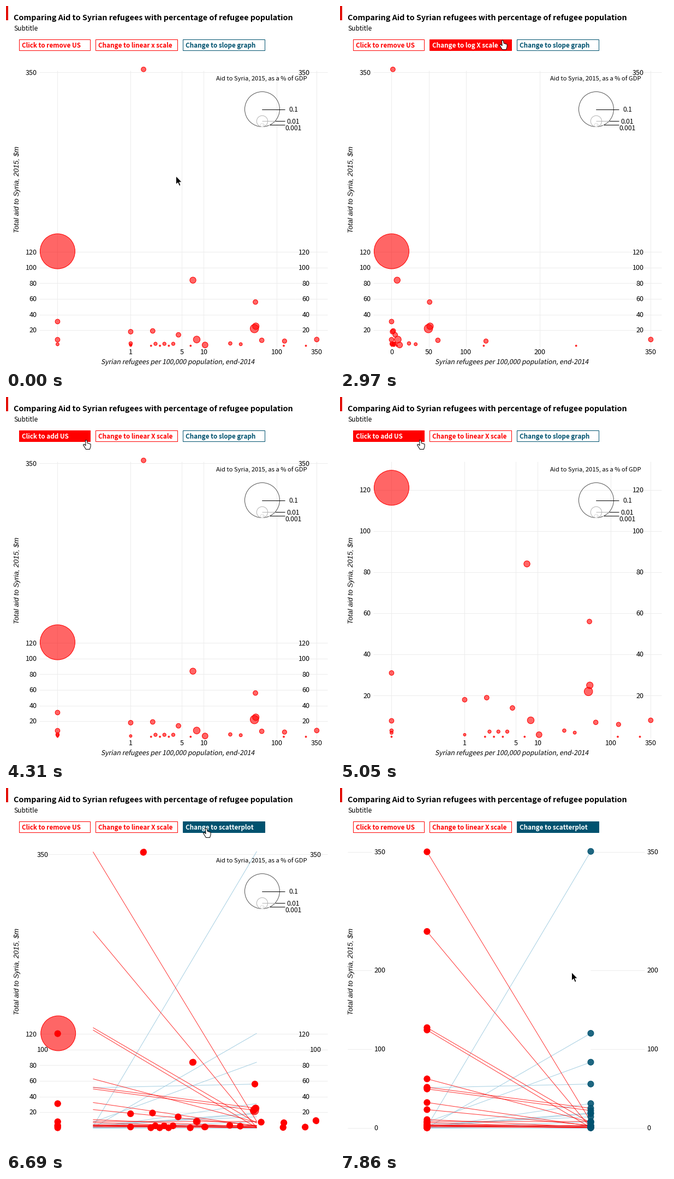
A matplotlib script for the animation above (8000 ms loop, 601 by 663 pixels).

```python
import matplotlib.pyplot as plt
import numpy as np
from matplotlib.animation import FuncAnimation
from matplotlib.collections import LineCollection, PatchCollection
from matplotlib.patches import Circle, PathPatch, Polygon, Rectangle
from matplotlib.textpath import TextPath
from matplotlib.transforms import Affine2D

W, H = 601, 663
LOOP, INTERVAL = 8000, 50
STEP = LOOP / 54          # the picture advances 54 times per loop
FONT = "Noto Sans CJK JP"
RED, BLUE, GRID = "#ff0000", "#00526f", "#ececec"
PX = 0.72                 # points per pixel at 100 dpi
BASE, LEFT_X, RIGHT_X = 620, 159, 459
SCATTER, SLOPE = 1.426, 1.44   # pixels per $m

plt.rcParams["font.family"] = FONT


def lerp(a, b, t):
    return a + (b - a) * t


def ease(now, start, length=1000):
    t = np.clip((now - start) / length, 0, 1)
    return 4 * t ** 3 if t < 0.5 else 1 - 4 * (1 - t) ** 3


def log_x(v):
    return 228 + 134 * np.log10(np.maximum(v, 0.1))


def lin_x(v):
    return 94 + v * 475 / 350


def dataset():
    """Refugees per 100,000, aid in $m and circle radius."""
    single = [(0, 3), (0, 0), (1, 1), (1, 18), (1.5, 354), (2, 19), (4.5, 14), (6.6, 0),
              (23, 3), (32, 2), (50.8, 56), (62, 7), (124, 0), (127, 6), (249, 0), (350, 8)]
    hosts_none = [(0, 31 / 4 ** k) for k in range(3)]
    trail = [(1.9 * 1.15 ** k, 2.5 * (k % 2)) for k in range(6)]
    small = [(v, aid, min(1.3 + 1.1 * aid ** 0.5, 4.3))
             for v, aid in single + hosts_none + trail]
    generous = [(0, 121, 32), (7.1, 84, 5.6), (49.2, 22, 7.7),
                (51.4, 25, 6), (8, 8, 6.2), (10.4, 1, 5.3)]
    return np.array(small + generous).T


VALUE, AID, RADIUS = dataset()
AID_Y = BASE - SCATTER * AID
LEFT_Y = BASE - SLOPE * VALUE

# pointer trips: first tick, ticks taken, goal x, goal y
TRIPS = ((0, 2, 425, 174), (3, 4, 420, 68), (10, 2, 298, 62),
         (24, 4, 147, 78), (37, 4, 367, 73), (50, 3, 424, 336))
ARROW = np.array([(0, 0), (0, 15.5), (3.5, 12.2), (6, 18), (8.6, 17), (6.2, 11.3), (11, 11.3)])
HAND = np.array([(-2, 0.4), (0.6, 0.4), (1.8, 5.6), (7.6, 7.5), (7.6, 12),
                 (6, 17), (-1, 17), (-6, 9), (-4.4, 7.6), (-1.4, 10)])
BUTTONS = ((24, 130), (164, 150), (324, 150))

fig = plt.figure(figsize=(W / 100, H / 100), dpi=100, facecolor="white")
ax = fig.add_axes([0, 0, 1, 1])
# whole numbers fall on pixel centres
ax.set_xlim(-0.45, W - 0.45)
ax.set_ylim(H - 0.55, -0.55)
ax.axis("off")
live = []


def keep(artist):
    live.append(artist)
    return artist


def put(x, y, text, size, color="black", **kw):
    return ax.text(x, y, text, fontsize=size * PX, color=color, va="baseline", **kw)


def lines(segments, color, alpha=1.0, z=1):
    keep(ax.add_collection(LineCollection(
        segments, colors=color, linewidths=PX, alpha=alpha, zorder=z)))


def circles(xs, ys, rs, face, edge, z):
    shapes = [Circle((x, y), r) for x, y, r in zip(xs, ys, rs)]
    keep(ax.add_collection(PatchCollection(
        shapes, facecolors=[face], edgecolors=[edge], linewidths=PX, zorder=z)))


def header():
    ax.add_patch(Rectangle((-1, -1), 5, 26, color="#e3120b", lw=0))
    put(14, 25, "Comparing Aid to Syrian refugees with percentage of refugee population",
        14.33, weight="bold")
    put(14, 44, "Subtitle", 12)
    put(24, 413, "Total aid to Syria, 2015, $m", 13, family="Liberation Sans",
        style="italic", rotation=90, rotation_mode="anchor")


def buttons(us_off, linear, slope, tick):
    x_case = "x" if tick < 14 else "X"
    labels = (
        ("Click to add US" if us_off else "Click to remove US", us_off, RED),
        ("Change to log X scale" if linear else f"Change to linear {x_case} scale", linear, RED),
        ("Change to scatterplot" if slope else "Change to slope graph", slope, BLUE),
    )
    for (x, w), (text, on, color) in zip(BUTTONS, labels):
        keep(ax.add_patch(Rectangle((x, 60), w, 20, fc=color if on else "white",
                                    ec=color, lw=PX)))
        keep(put(x + 5, 75, text, 11.65, "white" if on else color, weight="bold"))


def legend(alpha):
    if alpha < 0.01:
        return
    keep(put(385, 135, "Aid to Syria, 2015, as a % of GDP", 11.2, alpha=alpha, zorder=6))
    inks = ("#555555", "#b4b4b4", "#dddddd")
    for k, (ink, text_y) in enumerate(zip(inks, (192, 214, 226))):
        r = 32 / 10 ** (k / 2)
        y = 220 - r
        rim = 469 + np.sqrt(32 ** 2 - (y - 188) ** 2)
        keep(ax.add_patch(Circle((469, y), r, fill=False, ec=ink, lw=PX, alpha=alpha, zorder=6)))
        lines([[(469, y), (rim, y)]], ink if k else "black", alpha, z=6)
        lines([[(rim if k else 469, y), (511, y)]], "black", alpha, z=6)
        keep(put(526, text_y, f"{0.1 ** (k + 1):.{k + 1}f}", 12, ha="center",
                 alpha=alpha, zorder=6))


def x_axis(u):
    for v in (0.1, 1, 5, 10, 0, 50, 200, 100, 350):
        alpha = 1 - u if v in (0.1, 1, 5, 10) else u if v in (0, 50, 200) else 1
        if alpha < 0.01:
            continue
        x = lerp(log_x(v), lin_x(v), u)
        lines([[(x, 117), (x, 622)]], GRID, alpha)
        if v != 0.1:
            keep(put(x, 635, str(v), 12.5, ha="center", alpha=alpha))
    title = TextPath((0, 0), "Syrian refugees per 100,000 population, end-2014",
                     size=12.2, prop={"family": FONT})
    slant = Affine2D().skew_deg(11, 0).scale(1, -1).translate(173.5, 653.5)
    keep(ax.add_patch(PathPatch(slant.transform_path(title), fc="black", lw=0)))


def y_tick(v, y, alpha, slope, moved):
    if alpha < 0.01 or y < -20:
        return
    spans = ((lerp(61, 14, moved), lerp(530, 58, moved)),
             (lerp(530, 459, moved), lerp(589, 558, moved)))
    lines([[(a, y), (b, y)] for a, b in spans], GRID, alpha)
    for x in (56, 556):
        keep(put(x + 6 * moved, y + 4.2, str(v), 12.5, alpha=alpha,
                 ha="left" if slope else "right", zorder=2))


def y_axis(zoom, z, slope, s):
    for v in (350, 120, 100, 80, 60, 40, 20):
        y = BASE - v * SCATTER * zoom
        if slope and v in (350, 100):
            y_tick(v, lerp(y, BASE - SLOPE * v, s), 1, True, s)
        else:
            y_tick(v, y, (1 - z if v == 350 else 1) * (1 - s), False, 0)
    if slope:
        for v in (200, 0):
            y_tick(v, BASE - SLOPE * v, s, True, 1)


def slope_lines():
    falling = LEFT_Y < AID_Y
    for mask, color, alpha in ((~falling, "#a6cfe2", 1), (falling, RED, 0.8)):
        lines([[(LEFT_X, a), (RIGHT_X, b)] for a, b in zip(LEFT_Y[mask], AID_Y[mask])],
              color, alpha, z=3)


def pointer(tick):
    tip = np.array([311.0, 310.0])
    for start, length, *goal in TRIPS:
        tip = lerp(tip, np.array(goal), np.clip((tick - start) / length, 0, 1))
    hover = 60 <= tip[1] <= 80 and any(x <= tip[0] <= x + w for x, w in BUTTONS)
    shape, fill, edge = (HAND, "white", "black") if hover else (ARROW, "black", "white")
    keep(ax.add_patch(Polygon(shape + tip, fc=fill, ec=edge, lw=PX,
                              joinstyle="round", zorder=10)))


def draw(i):
    while live:
        live.pop().remove()
    tick = int((i * INTERVAL + 40) / STEP)
    now = tick * STEP
    u = ease(now, 2050) - ease(now, 3200)
    z = ease(now, 4370) - ease(now, 5250)
    s = ease(now, 6571)
    slope = tick >= 45
    zoom = lerp(1, 2.919, z)

    buttons(29 <= tick < 35, 14 <= tick < 22, slope, tick)
    if not slope:
        x_axis(u)
    y_axis(zoom, z, slope, s)
    if slope:
        slope_lines()
    legend(1 - s)

    start = log_x(VALUE)
    if tick < 22:
        start[:2] = log_x(1)   # two zeros first sit at 1 on the log axis
    xs = lerp(start, lin_x(VALUE), u)
    ys = BASE - (BASE - AID_Y) * zoom
    face = lerp(np.array([1, 0, 0, 0.6]), np.array([0, 0.32, 0.44, 0.88]), s)
    edge = lerp(np.array([1, 0, 0, 1]), np.array([0, 0.32, 0.44, 1]), s)
    circles(lerp(xs, RIGHT_X, s), ys, lerp(RADIUS, 5.5, s), face, edge, 4)
    if slope:
        circles(lerp(xs, LEFT_X, s), lerp(ys, LEFT_Y, s), np.full(len(xs), 5.6), RED, RED, 5)
    pointer(tick)
    return live


header()
anim = FuncAnimation(fig, draw, frames=LOOP // INTERVAL, interval=INTERVAL,
                     repeat=True, repeat_delay=0, cache_frame_data=False)
plt.show()
```
